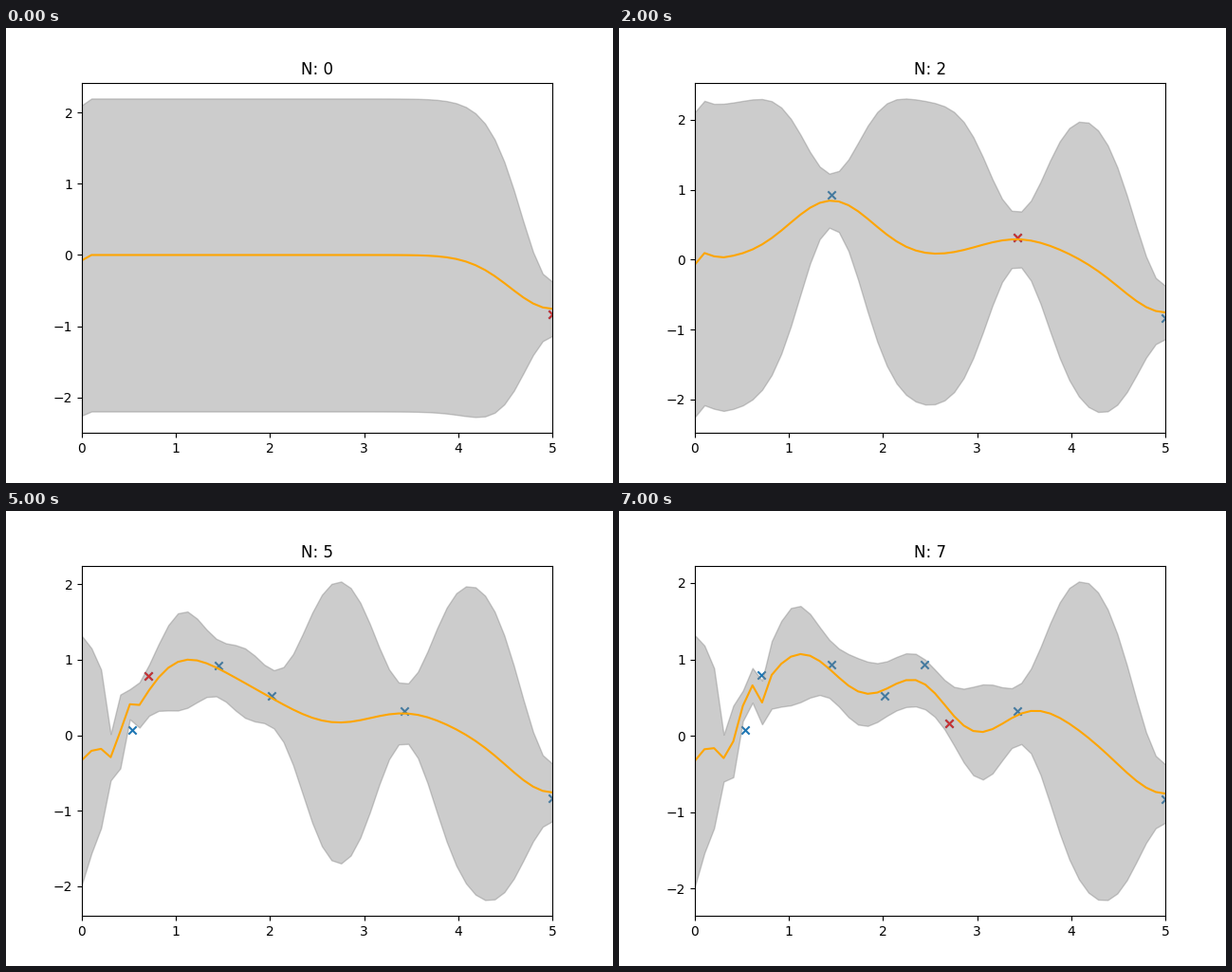
Write a matplotlib script that moves like this. It is 640x480 px and loops after 8 s.

```python
import numpy as np
import matplotlib.pyplot as plt
from matplotlib.animation import FuncAnimation

NOISE = 0.1
LENGTH_SQ = 0.2
GRID = np.linspace(0, 5, 50)

# Key points in the order they are observed; every curve is derived from them
X = np.array([5, 1.452, 3.423, 0.534, 2.02, 0.706, 2.441, 2.702])
Y = np.array([-0.832, 0.928, 0.319, 0.0745, 0.517, 0.79, 0.937, 0.161])


def kernel(a, b):
    """RBF kernel with the noise term added along the diagonal."""
    dist_sq = (a[:, None] - b) ** 2
    return np.exp(-dist_sq / (2 * LENGTH_SQ)) + NOISE * np.eye(len(a), len(b))


def posterior(x, y):
    """Gaussian process mean and variance on the grid."""
    cross = kernel(GRID, x)
    weights = np.linalg.solve(kernel(x, x), cross.T).T
    return weights @ y, 1 + NOISE - np.sum(weights * cross, axis=1)


fig, ax = plt.subplots(figsize=(6.4, 4.8), dpi=100)


def draw(n):
    x, y = X[:n + 1], Y[:n + 1]
    mean, var = posterior(x, y)
    ax.clear()
    ax.set_title(f"N: {n}")
    ax.scatter(x, y, marker="x", color="tab:blue")
    ax.scatter(x[-1], y[-1], marker="x", color="red")
    ax.fill_between(GRID, mean - 2 * var, mean + 2 * var,
                    color="gray", alpha=0.4)
    ax.plot(GRID, mean, color="orange")
    ax.set_xlim(0, 5)


anim = FuncAnimation(fig, draw, frames=len(X), init_func=lambda: None,
                     interval=1000, repeat=True, repeat_delay=0)
plt.show()
```
